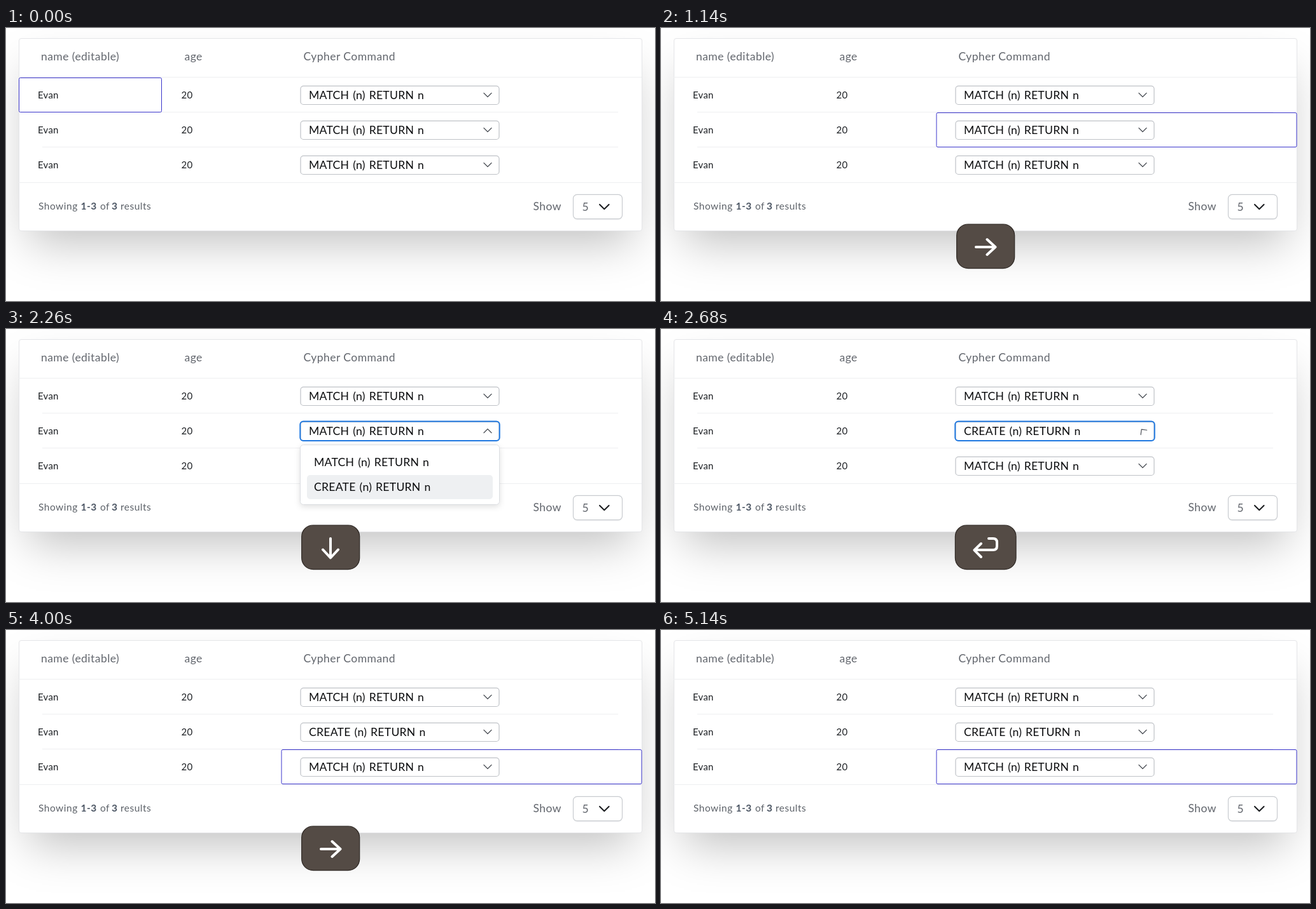
An HTML page for the animation above (5210 ms loop, 1020 by 430 pixels).

```html
<!DOCTYPE html>
<html lang="en">
<head>
<meta charset="utf-8">
<title>Table keyboard navigation</title>
<style>
  html, body { margin: 0; width: 100%; height: 100%; overflow: hidden; background: #fff; }
  #stage { position: relative; width: 1020px; height: 430px; overflow: hidden; }
  #card {
    position: absolute; box-sizing: border-box; left: 19.5px; top: 16px; width: 980.5px; height: 303.5px;
    background: #fff; border: 1px solid #e4e5e8; border-radius: 4px;
    box-shadow: 0 34px 68px -16px rgba(0, 0, 0, .25);
  }
  svg { position: absolute; left: 0; top: 0; }
  text { font-family: Lato, "Noto Sans", sans-serif; white-space: pre; }
  .head { font-size: 17.5px; letter-spacing: .45px; fill: #62666d; }
  .cell { font-size: 15px; letter-spacing: .25px; fill: #1f2226; }
  .pick { font-size: 17.6px; letter-spacing: .25px; word-spacing: 1.2px; fill: #0c0d0f; }
  .foot { font-size: 15.5px; letter-spacing: .5px; fill: #5e636a; }
  .foot .b { font-weight: 700; fill: #4b5563; }
  .rule { stroke: #eeeff1; }
  .line { fill: none; stroke-linecap: round; stroke-linejoin: round; }
</style>
</head>
<body>
<div id="stage">
  <div id="card"></div>
  <svg id="art" width="1020" height="430" viewBox="0 0 1020 430"></svg>
</div>
<script>
const LOOP = 5210;
const COLS = [20.5, 245.5, 433], ENDS = [244.5, 432.5, 999];
const ROW_Y = [78.5, 133.5, 188.5];
const OPTIONS = ['MATCH (n) RETURN n', 'CREATE (n) RETURN n'];

// [start, row, column]; row -1 means no selected cell
const CELLS = [[0, 0, 0], [220, 1, 0], [440, 1, 1], [660, 1, 2], [1320, -1, 0],
  [3220, 1, 2], [3520, 1, 1], [3820, 2, 1], [4000, 2, 2]];
const KEYS = [[0, ''], [220, 'down'], [440, 'right'], [1320, 'enter'], [1700, 'space'],
  [2240, 'down'], [2680, 'enter'], [3220, 'esc'], [3520, 'left'], [3820, 'down'],
  [4000, 'right'], [4780, '']];

const art = document.getElementById('art');

function add(tag, attrs, parent = art, text) {
  const el = document.createElementNS('http://www.w3.org/2000/svg', tag);
  for (const k in attrs) el.setAttribute(k, attrs[k]);
  if (text !== undefined) el.textContent = text;
  parent.appendChild(el);
  return el;
}
const label = (x, y, cls, s, parent) => add('text', { x, y, class: cls }, parent, s);
const rule = (x1, x2, y) => add('line', { x1, x2, y1: y, y2: y, class: 'rule' });
const box = (x, y, w, h, rx, attrs, parent) =>
  add('rect', { x, y, width: w, height: h, rx, fill: 'none', ...attrs }, parent);
const stroke = (d, color, width, parent) =>
  add('path', { d, class: 'line', stroke: color, 'stroke-width': width }, parent);
const show = (el, on) => el.setAttribute('visibility', on ? 'visible' : 'hidden');
const ramp = (t, a, b) => Math.min(1, Math.max(0, (t - a) / (b - a)));
const at = (list, t) => list.filter(e => e[0] <= t).pop();

// Header and rules
label(55, 51, 'head', 'name (editable)');
label(280.5, 51, 'head', 'age');
label(467.5, 51, 'head', 'Cypher Command');
rule(20, 999, 77.5);
rule(57, 962, 132.5);
rule(57, 962, 187.5);
rule(20, 999, 243.5);

// Rows
const picks = ROW_Y.map(y => {
  label(50, y + 32, 'cell', 'Evan');
  label(275.5, y + 32, 'cell', '20');
  box(463, y + 12.8, 312, 29.2, 4.5, { stroke: '#bfc2c7', 'stroke-width': 1.2 });
  const text = label(476, y + 33, 'pick', OPTIONS[0]);
  const arrow = stroke('M-6 -3L0 3L6 -3', '#4a4e55', 1.2);
  arrow.setAttribute('transform', `translate(757 ${y + 27})`);
  return { text, arrow, y };
});
const focus = box(462.3, 145.4, 313.4, 30.6, 5, { stroke: '#1f78e0', 'stroke-width': 2 });
const cell = box(0, 0, 0, 54, 2, { stroke: '#3a34cb' });

// Footer
const foot = label(51, 286, 'foot', '');
[[51, 'Showing'], [117.5, '1-3', 'b'], [148, 'of'], [166, '3', 'b'], [180, 'results']]
  .forEach(([x, s, cls = '']) => add('tspan', { x, class: cls }, foot, s));
label(828.5, 287, 'head', 'Show');
box(891.5, 264, 77, 38.5, 6, { fill: '#f3f4f5' });
box(891.5, 262.3, 77, 38.4, 6, { fill: '#fff', stroke: '#c8cbcf', 'stroke-width': 1.2 });
label(905.5, 287.5, 'head', '5');
stroke('M933 278L940.3 285.3L947.6 278', '#1b1d20', 2);

// Option list
const menu = add('g', {});
box(462.5, 182.5, 313, 94, 5, {
  fill: '#fff', stroke: '#dcdee2', style: 'filter:drop-shadow(0 3px 5px rgba(0,0,0,.12))'
}, menu);
const hover = box(473, 0, 292, 38, 5, { fill: '#eef0f2' }, menu);
OPTIONS.forEach((s, i) => label(484, 216 + i * 39, 'pick', s, menu));

// Key cap
const cap = add('g', {});
const plate = box(0, 309, 0, 69.6, 18, { fill: '#544b45', stroke: '#2f2925', 'stroke-width': 1.2 }, cap);
const ARROW = 'M495 345H525M512.5 333L525.5 345L512.5 357';
const icons = {};
[['right', 0], ['left', 180], ['down', 90]].forEach(([name, turn]) => {
  icons[name] = stroke(ARROW, '#fff', 4, cap);
  icons[name].setAttribute('transform', `rotate(${turn} 510 345)`);
});
icons.enter = stroke('M515 330H522Q528 330 528 336V342Q528 348 522 348H493M503 338L492.5 348.3L503 359', '#fff', 4, cap);
icons.space = add('path', { d: 'M496.2 356.5V364.7H523.8V356.5', fill: 'none', stroke: '#fff', 'stroke-width': 2.4 }, cap);
icons.esc = add('text', { x: 510, y: 352, 'font-size': 25, fill: '#fff', 'text-anchor': 'middle' }, cap, 'esc');

function keyAlpha(t) {
  if (t >= 660 && t < 860) return 1 - .5 * Math.sin(Math.PI * ramp(t, 660, 860));
  return t < 4680 ? 1 : .62 * (1 - ramp(t, 4680, 4780));
}

function draw(t) {
  const [, row, col] = at(CELLS, t);
  show(cell, row >= 0);
  if (row >= 0) {
    cell.setAttribute('x', COLS[col]);
    cell.setAttribute('y', ROW_Y[row]);
    cell.setAttribute('width', ENDS[col] - COLS[col]);
  }

  focus.setAttribute('opacity', ramp(t, 1300, 1420) * (1 - ramp(t, 3200, 3280)));
  const mid = picks[1];
  mid.text.textContent = OPTIONS[t >= 2680 ? 1 : 0];
  const turn = t < 2680 ? 180 * ramp(t, 1850, 1960) : 145 * (1 - ramp(t, 2680, 2740));
  mid.arrow.setAttribute('transform', `translate(757 ${mid.y + 27}) rotate(${turn})`);

  show(menu, t >= 1860 && t < 2680);
  menu.setAttribute('opacity', ramp(t, 1840, 1900));
  hover.setAttribute('y', t < 2240 ? 191 : 230);

  const key = at(KEYS, t)[1];
  cap.setAttribute('display', key ? 'inline' : 'none');
  cap.setAttribute('opacity', keyAlpha(t));
  const w = key === 'enter' ? 95.6 : 91;
  plate.setAttribute('x', 510.2 - w / 2);
  plate.setAttribute('width', w);
  for (const name in icons) show(icons[name], name === key);
}

const start = performance.now();
function tick() {
  draw((performance.now() - start) % LOOP);
  requestAnimationFrame(tick);
}
draw(0);
requestAnimationFrame(tick);
</script>
</body>
</html>
```
